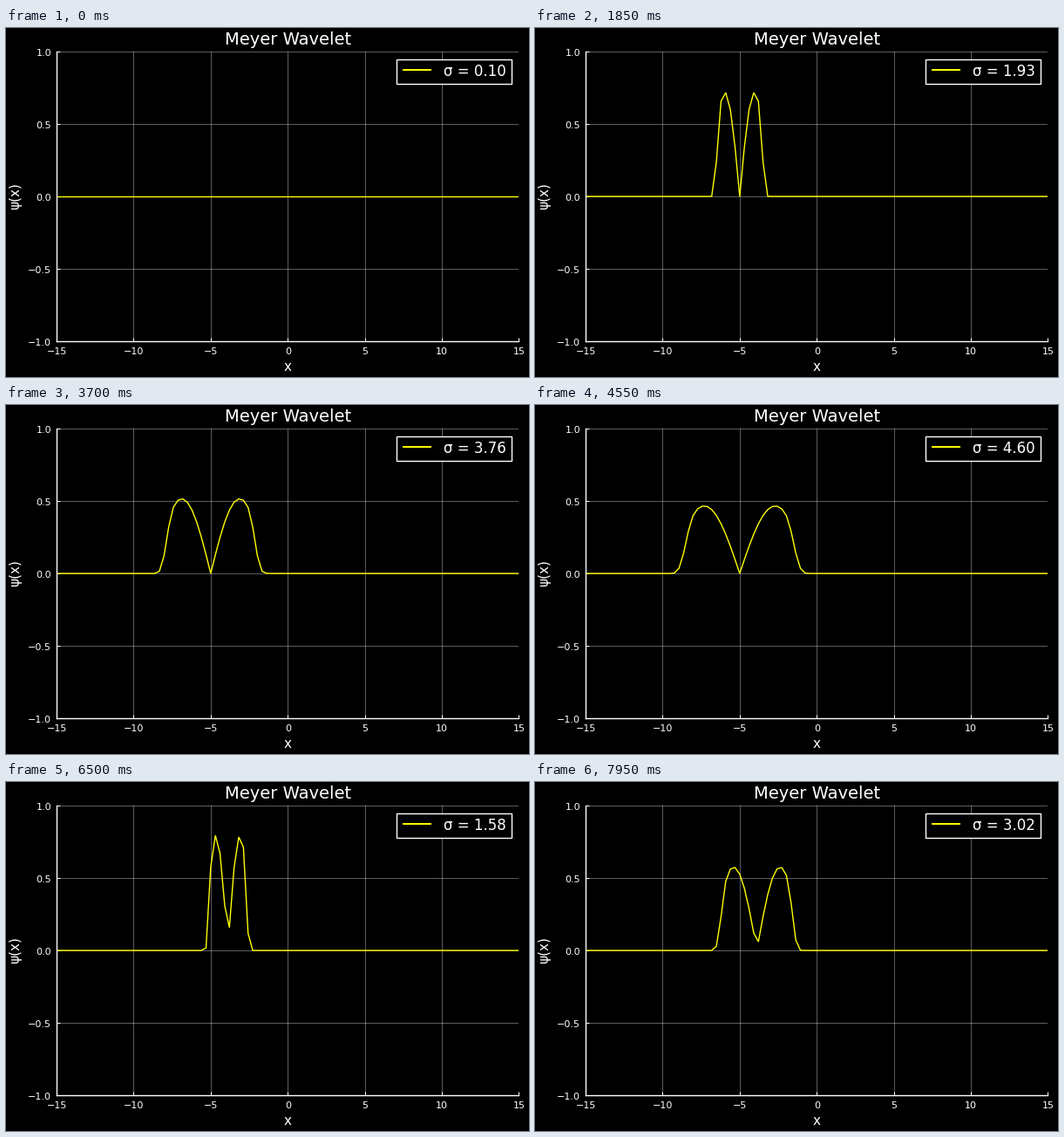
Write a matplotlib script that moves like this. It is 600 by 400 pixels and loops after 8000 ms.

```python
import numpy as np
import matplotlib
matplotlib.rcParams["toolbar"] = "None"
import matplotlib.pyplot as plt
from matplotlib.animation import FuncAnimation
from matplotlib.patches import Rectangle

W, H, DPI = 600, 400, 100
FRAMES, STEP_MS = 160, 50
LEFT, RIGHT, TOP, BOTTOM = 58.05, 588.45, 27.05, 359.05
PX = 72 / DPI  # points per pixel
YELLOW = "#ffff00"

plt.rcParams["font.family"] = "DejaVu Sans"

x = np.linspace(-15, 15, 100)
sigmas = np.linspace(0.1, 5, 100)
shifts = np.linspace(-5, 5, 10)


def smooth(v):
    v = np.clip(v, 0, 1)
    return v**4 * (35 - 84 * v + 70 * v**2 - 20 * v**3)


def wavelet(sigma, shift):
    u = np.abs(x - shift) / sigma
    y = np.sin(np.pi * u) * np.cos(np.pi / 2 * smooth(2 * u - 1))
    return np.where(u < 1 - 1e-9, y, 0) / np.sqrt(sigma)


fig = plt.figure(figsize=(W / DPI, H / DPI), dpi=DPI, facecolor="black")
ax = fig.add_axes([LEFT / W, 1 - BOTTOM / H,
                   (RIGHT - LEFT) / W, (BOTTOM - TOP) / H])
ax.set(xlim=(-15, 15), ylim=(-1, 1), facecolor="black")
ax.set_xticks(range(-15, 16, 5), labels=[])
ax.set_yticks(np.arange(-1, 1.1, 0.5), labels=[])
ax.set_axisbelow(True)
ax.grid(color="white", alpha=0.36, lw=PX)
ax.tick_params(direction="in", color="white", length=4 * PX, width=PX)
for side in ("top", "right"):
    ax.spines[side].set_visible(False)
for side in ("left", "bottom"):
    ax.spines[side].set(color="white", linewidth=1.4 * PX)


def label(px, py, text, size, ha="center", **kw):
    kw.setdefault("va", "baseline")
    return fig.text(px / W, 1 - py / H, text, fontsize=size, ha=ha,
                    color="white", **kw)


def number(value, digits):
    return f"{value:.{digits}f}".replace("-", "\u2212")


label(323.5, 19, "Meyer Wavelet", 14)
label(323.2, 393, "x", 11)
label(18, 192.6, "ψ(x)", 11, ha="right", va="center", rotation=90)
for k in range(7):
    label(LEFT + (RIGHT - LEFT) * k / 6, 374, number(5 * k - 15, 0), 8)
for k in range(5):
    label(52, 32 + 83 * k, number(1 - k / 2, 1), 8, ha="right")

curve, = ax.plot(x, 0 * x, color=YELLOW, lw=1, solid_joinstyle="miter")

# Legend, laid out in pixels
key = fig.add_axes([0, 0, 1, 1])
key.set(xlim=(0, W), ylim=(H, 0))
key.axis("off")
key.add_patch(Rectangle((448.05, 36.05), 132, 28, fc="black", ec="white",
                        lw=1.4 * PX))
key.plot([455, 488], [48, 48], color=YELLOW, lw=2 * PX,
         solid_capstyle="butt")
caption = label(502, 55, "", 12, ha="left")


def draw(i):
    cycle, k = divmod(i, len(sigmas))
    curve.set_ydata(wavelet(sigmas[k], shifts[cycle]))
    caption.set_text(f"σ = {sigmas[k]:.2f}")
    return curve, caption


anim = FuncAnimation(fig, draw, frames=FRAMES, interval=STEP_MS,
                     repeat=True, repeat_delay=0, blit=False)
plt.show()
```
